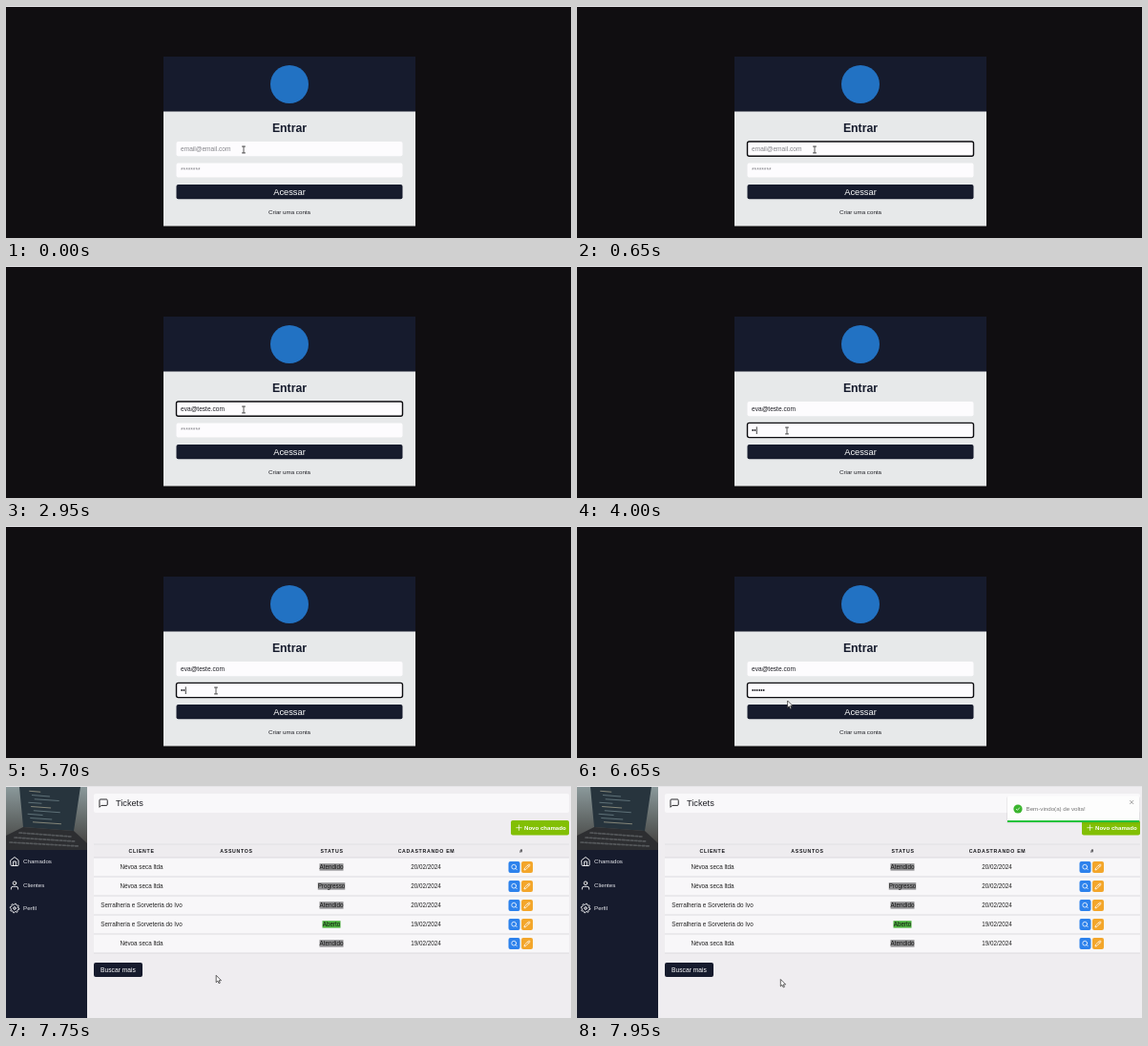
An HTML page that plays this animation: 592x243 px, repeating every 8000 ms.

```html
<!DOCTYPE html>
<html lang="pt-BR">
<head>
<meta charset="utf-8">
<title>Entrar</title>
<style>
  html, body { margin: 0; width: 100%; height: 100%; overflow: hidden; background: #100e11; }
  svg { display: block; width: 100vw; height: 100vh; font-family: Arial, "Liberation Sans", sans-serif; }
  text { white-space: pre; }
  .mid { text-anchor: middle; }
  .b { font-weight: bold; }
  .line { fill: none; stroke-linecap: round; stroke-linejoin: round; }
</style>
</head>
<body>
<svg id="stage" viewBox="0 0 592 243" preserveAspectRatio="none"></svg>
<script>
const LOOP = 8000;
const NAVY = '#161b2d';

const rect = (x, y, w, h, fill, r = 0, more = '') =>
  `<rect x="${x}" y="${y}" width="${w}" height="${h}" rx="${r}" fill="${fill}" ${more}/>`;
const text = (x, y, size, fill, str, cls = '', more = '') =>
  `<text x="${x}" y="${y}" font-size="${size}" fill="${fill}" class="${cls}" ${more}>${str}</text>`;
const icon = (x, y, scale, colour, d, width = 2) =>
  `<path class="line" transform="translate(${x} ${y}) scale(${scale})" d="${d}" stroke="${colour}" stroke-width="${width}"/>`;

const ICONS = {
  chat: 'M21 15a2 2 0 0 1-2 2H7l-4 4V5a2 2 0 0 1 2-2h14a2 2 0 0 1 2 2z',
  home: 'M3 9l9-7 9 7v11a2 2 0 0 1-2 2H5a2 2 0 0 1-2-2zM9 22V12h6v10',
  user: 'M20 21v-2a4 4 0 0 0-4-4H8a4 4 0 0 0-4 4v2M16 7a4 4 0 1 1-8 0a4 4 0 1 1 8 0',
  search: 'M19 11a8 8 0 1 1-16 0a8 8 0 1 1 16 0M21 21l-4.3-4.3',
  pencil: 'M17 3a2.8 2.8 0 0 1 4 4L7.5 20.5 2 22l1.5-5.5zM14 6l4 4',
  plus: 'M12 4v16M4 12h16',
  cross: 'M5 5l14 14M19 5L5 19',
  gear: gearPath()
};

function gearPath() {
  const pts = [];
  for (let i = 0; i < 32; i++) {
    const a = (i + 0.5) * Math.PI / 16;
    const r = i % 4 < 2 ? 10.8 : 8.2;
    pts.push((12 + r * Math.cos(a)).toFixed(1) + ' ' + (12 + r * Math.sin(a)).toFixed(1));
  }
  return 'M' + pts.join('L') + 'zM15 12a3 3 0 1 1-6 0a3 3 0 1 1 6 0';
}

function field(id, y, hint) {
  return rect(178.5, y, 237, 15.2, '#fdfcfe', 2) +
    rect(178.5, y, 237, 15.2, 'none', 2, `id="${id}Ring" stroke="#0d0d10" stroke-width="1.4"`) +
    text(183, y + 9.9, 6.6, '#85858a', hint, '', `id="${id}Hint"`) +
    text(183, y + 9.9, 6.6, '#1c1c22', '', '', `id="${id}Text"`) +
    rect(0, y + 4, 0.8, 7.6, '#111', 0, `id="${id}Caret"`);
}

function loginView() {
  return rect(0, 1, 592, 242, '#100e11') +
    rect(165, 53, 264, 177.5, '#e7e9ea') +
    rect(165, 53, 264, 57.5, NAVY) +
    '<circle cx="297" cy="82" r="20" fill="#2272c3"/>' +
    text(297, 132, 12.3, NAVY, 'Entrar', 'mid b') +
    field('mail', 142, 'email@email.com') +
    field('pass', 164.4, '********') +
    rect(178.5, 187, 237, 15.2, NAVY, 2) +
    text(297, 198, 9.3, '#fff', '', 'mid', 'id="submit"') +
    text(297, 218.3, 6.2, '#1c1c22', 'Criar uma conta', 'mid');
}

function photo() {
  let code = '';
  for (let i = 0; i < 9; i++) {
    const y = 6 + i * 4;
    code += rect(23 + (i % 3) * 3, y, 12 + (i * 7) % 19, 1, i % 4 ? '#71858c' : '#a3a08c', 0, 'opacity=".75"');
  }
  return `<defs><linearGradient id="desk" x2="0" y2="1">
      <stop offset="0" stop-color="#8b999b"/><stop offset=".6" stop-color="#5d6261"/><stop offset="1" stop-color="#403c3a"/>
    </linearGradient></defs>` +
    rect(0, 1, 85, 66, 'url(#desk)') +
    '<path d="M14 1H78L71 47L18 43Z" fill="#27343d"/>' +
    `<g transform="rotate(4 40 24)">${code}</g>` +
    '<path d="M18 43L71 47L85 60V67H0V52Z" fill="#2d2e31"/>' +
    '<path class="line" d="M14 49L68 53M9 54L72 58M4 59L76 63" stroke="#55585b" stroke-width="1.7" stroke-dasharray="2.5 1.8"/>';
}

function tableView() {
  const heads = [[142, 'CLIENTE'], [241.5, 'ASSUNTOS'], [341.5, 'STATUS'], [440.5, 'CADASTRANDO EM'], [540, '#']];
  const mist = 'Névoa seca ltda', shop = 'Serralheria e Sorveteria do Ivo';
  const done = ['Atendido', 25, '#8e8e90'];
  const rows = [
    [mist, done, '20'],
    [mist, ['Progresso', 28.5, '#8e8e90'], '20'],
    [shop, done, '20'],
    [shop, ['Aberto', 19, '#4bb13d'], '19'],
    [mist, done, '19']
  ];
  let out = rect(92, 61, 498, 14, '#eeecef') + rect(92, 60.7, 498, 0.6, '#d8d6d9');
  for (const [x, name] of heads) out += text(x, 69.6, 5.2, '#16161a', name, 'mid b', 'letter-spacing=".7"');
  rows.forEach(([client, [status, w, colour], day], i) => {
    const y = 75 + i * 20, base = y + 12;
    out += rect(92, y, 498, 20, '#f8f7f9') + rect(92, y - 0.4, 498, 0.8, '#d5d3d7') +
      text(142, base, 6.3, '#222', client, 'mid') +
      rect(341 - w / 2, y + 6.2, w, 7.4, colour) +
      text(341, base, 6.3, '#161616', status, 'mid') +
      text(440, base, 6.3, '#222', day + '/02/2024', 'mid') +
      rect(526.5, y + 4, 12, 12, '#2d82ec', 2) + icon(528.9, y + 6.4, 0.3, '#fff', ICONS.search, 2.6) +
      rect(540, y + 4, 12, 12, '#f3a62b', 2) + icon(542.4, y + 6.4, 0.3, '#fff', ICONS.pencil, 2.6);
  });
  return out + rect(92, 174.6, 498, 0.8, '#d5d3d7');
}

function toast() {
  return `<g id="toast">` +
    rect(450, 11, 140, 28.5, '#000', 2, 'opacity=".06"') +
    rect(451, 10.5, 138, 27.5, '#fdfdfd', 1.5) +
    rect(451, 36, 138, 2, '#25c33c') +
    '<circle cx="462" cy="24" r="4.6" fill="#3bb52f"/>' +
    icon(458.6, 20.6, 0.28, '#fff', 'M6 13l4 4L18 8', 2.6) +
    text(470.5, 26.2, 6.2, '#757575', 'Bem-vindo(a) de volta!') +
    icon(578.2, 14, 0.25, '#777', ICONS.cross, 2.6) + '</g>';
}

function panelView() {
  const menu = [['home', 'Chamados', 79], ['user', 'Clientes', 104], ['gear', 'Perfil', 128]];
  return rect(0, 1, 592, 242, '#efedf0') + rect(0, 1, 85, 242, NAVY) + photo() +
    menu.map(([key, name, y]) => icon(3.6, y - 5.4, 0.45, '#fff', ICONS[key]) +
      text(18, y + 2.2, 6.2, '#e6e7ec', name)).join('') +
    rect(92, 8, 498, 20, '#f9f8fa', 2) +
    icon(96.6, 12.6, 0.46, '#17171b', ICONS.chat) +
    text(115, 21.2, 9.2, '#1c1c22', 'Tickets') +
    rect(529, 36, 61, 15.5, '#82bf04', 2) +
    icon(533.4, 39.6, 0.34, '#fff', ICONS.plus) +
    text(543, 46, 6.1, '#fff', 'Novo chamado', 'b') +
    tableView() +
    rect(92, 185, 51, 15, NAVY, 2) +
    text(117.5, 195, 6.7, '#fff', 'Buscar mais', 'mid') +
    toast();
}

document.getElementById('stage').innerHTML =
  rect(0, 0, 592, 243, '#e6e5e8') +
  `<g id="login">${loginView()}</g><g id="panel">${panelView()}</g>` +
  '<path id="beam" class="line" d="M-1.6 -3.4H1.6M0 -3.4V3.4M-1.6 3.4H1.6" stroke="#333" stroke-width=".8"/>' +
  '<path id="arrow" d="M0 0V7.4L1.7 5.8L2.9 8.4L4.1 7.9L3 5.4H5.3Z" fill="#fff" stroke="#222" stroke-width=".7"/>';

const $ = id => document.getElementById(id);
const show = (id, on) => { $(id).style.display = on ? '' : 'none'; };

const EMAIL = 'eva@teste.com';
const mailKeys = [950, 1150, 1300, 1800, 1900, 2000, 2100, 2250, 2350, 2400, 2550, 2600, 2700]
  .map((t, i) => [t, i + 1]);
const passKeys = [[3850, 1], [4000, 2], [4350, 3], [4550, 4], [4800, 3], [4900, 4], [5050, 3], [5150, 2],
  [5250, 1], [5400, 0], [5550, 1], [5700, 2], [5850, 3], [6000, 4], [6150, 5], [6300, 6]];
const focus = { mail: [450, 3600], pass: [3600, 7050] };
const mouse = [[3050, 249, 150.5], [3450, 220, 172.5], [6450, 220, 172.5], [6900, 221.5, 197.5],
  [7700, 221.5, 197.5], [7900, 213.3, 202.5]];

function lastKey(keys, t) {
  let hit = [-LOOP, 0];
  for (const key of keys) if (key[0] <= t) hit = key;
  return hit;
}

function mouseAt(t) {
  let prev = mouse[0];
  for (const next of mouse) {
    if (t < next[0]) {
      const p = Math.max(0, (t - prev[0]) / (next[0] - prev[0] || 1));
      const e = p * p * (3 - 2 * p);
      return [prev[1] + (next[1] - prev[1]) * e, prev[2] + (next[2] - prev[2]) * e];
    }
    prev = next;
  }
  return [prev[1], prev[2]];
}

function drawField(id, keys, value, t) {
  const [time, count] = lastKey(keys, t);
  const focused = t >= focus[id][0] && t < focus[id][1];
  const node = $(id + 'Text');
  node.textContent = value.slice(0, count);
  show(id + 'Hint', !count);
  show(id + 'Ring', focused);
  show(id + 'Caret', focused && (t - time < 250 || t % 1000 < 500));
  $(id + 'Caret').setAttribute('x', 183.2 + (count ? node.getComputedTextLength() : 0));
}

function draw(t) {
  const inside = t >= 7750;
  show('login', !inside);
  show('panel', inside);
  if (inside) {
    const p = Math.min(1, (t - 7750) / 150);
    $('toast').setAttribute('transform', `translate(${150 * (1 - p) ** 3} 0)`);
  } else {
    drawField('mail', mailKeys, EMAIL, t);
    drawField('pass', passKeys, '••••••', t);
    $('submit').textContent = t < 7050 ? 'Acessar' : 'Carregando...';
  }
  const [x, y] = mouseAt(t);
  const overField = !inside && ((y > 142 && y < 157.2) || (y > 164.4 && y < 179.6));
  show('beam', overField);
  show('arrow', !overField);
  $(overField ? 'beam' : 'arrow').setAttribute('transform', `translate(${x} ${y})`);
}

const start = performance.now();
function tick() {
  draw((performance.now() - start) % LOOP);
  requestAnimationFrame(tick);
}
tick();
</script>
</body>
</html>
```
